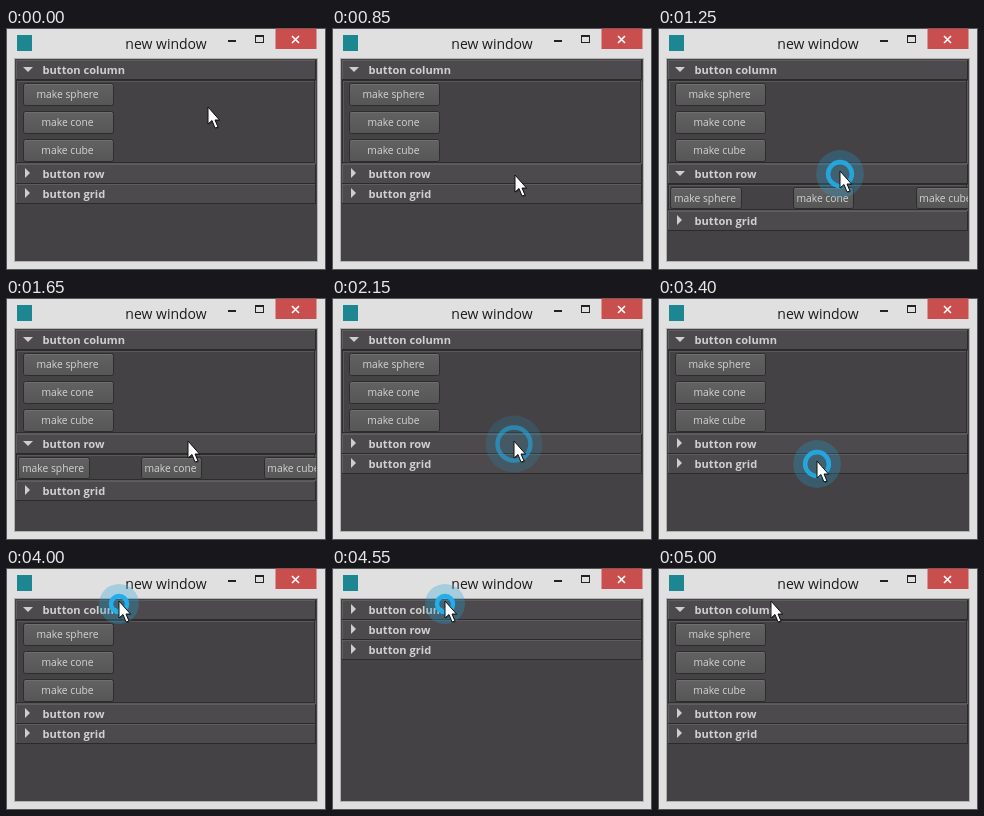
An HTML page with a canvas for the animation above (5.05 s loop, 320 by 242 pixels).

```html
<!DOCTYPE html>
<html lang="en">
<head>
<meta charset="utf-8">
<title>new window</title>
<style>
html, body { margin: 0; width: 320px; height: 242px; overflow: hidden; }
canvas { display: block; }
</style>
</head>
<body>
<canvas id="stage" width="320" height="242"></canvas>
<script>
const ctx = document.getElementById('stage').getContext('2d');
const LOOP = 5050, STEP = 50, RING = 450;

// Each click toggles one section one step after the ring appears.
const clicks = [
  { t: 1200, section: 'row' },
  { t: 1950, section: 'row' },
  { t: 2550, section: 'grid' },
  { t: 3350, section: 'grid' },
  { t: 4000, section: 'column' },
  { t: 4550, section: 'column' }
];

// Cursor moves: start, end, destination x, y.
const moves = [
  [50, 150, 202, 77],
  [450, 850, 183, 147],
  [950, 1050, 182, 143],
  [2500, 2550, 159, 163],
  [3800, 3850, 113, 33]
];

function rect(x, y, w, h, color) {
  ctx.fillStyle = color;
  ctx.fillRect(x, y, w, h);
}

function outline(x, y, w, h, color) {
  ctx.strokeStyle = color;
  ctx.lineWidth = 1;
  ctx.strokeRect(x + .5, y + .5, w - 1, h - 1);
}

function poly(points, color) {
  ctx.beginPath();
  points.forEach(([x, y]) => ctx.lineTo(x, y));
  ctx.closePath();
  ctx.fillStyle = color;
  ctx.fill();
}

function label(text, x, y, size, color, weight = 400, align = 'left') {
  ctx.font = `${weight} ${size}px "Open Sans", sans-serif`;
  ctx.textAlign = align;
  ctx.fillStyle = color;
  ctx.fillText(text, x, y);
}

function button(text, x, y, w, h) {
  const shade = ctx.createLinearGradient(0, y, 0, y + h);
  shade.addColorStop(0, '#636263');
  shade.addColorStop(1, '#575657');
  ctx.beginPath();
  ctx.roundRect(x + .5, y + .5, w - 1, h - 1, 2);
  ctx.fillStyle = shade;
  ctx.fill();
  ctx.strokeStyle = '#2e2d2e';
  ctx.lineWidth = 1;
  ctx.stroke();
  rect(x + 2, y + 1, w - 4, 1, '#706f70');
  label(text, x + w / 2 - 1, y + h / 2 + 3.5, 10.3, '#d4d4d4', 400, 'center');
}

function header(text, y, open) {
  rect(10, y, 300, 20, '#4c4a4c');
  rect(10, y, 300, 1, '#5e5c5e');
  rect(10, y, 1, 20, '#5e5c5e');
  rect(10, y + 19, 300, 1, '#2c2b2c');
  rect(309, y, 1, 20, '#2c2b2c');
  poly(open ? [[17, y + 7], [27, y + 7], [22, y + 12]]
            : [[19, y + 4], [19, y + 14], [24, y + 9]], '#cecece');
  label(text, 36.5, y + 14, 11.1, '#d0d0d0', 700);
}

const sections = [
  { name: 'column', height: 84, draw(y) {
    ['make sphere', 'make cone', 'make cube'].forEach((s, i) => button(s, 17, y + 3 + 28 * i, 91, 23));
  } },
  { name: 'row', height: 27, draw(y) {
    button('make sphere', 12, y + 3, 72, 22);
    button('make cone', 135, y + 3, 61, 22);
    button('make cube', 258, y + 3, 61, 22);
  } },
  { name: 'grid', height: 43, draw(y) {
    ['make sphere', 'make cone', 'make cube', 'make circle'].forEach((s, i) =>
      button(s, 12 + 80 * (i % 2), y + 1 + 20 * (i >> 1), 80, 20));
  } }
];

function drawFrame() {
  rect(0, 0, 320, 242, '#e0e0e0');
  outline(0, 0, 320, 242, '#55575a');
  rect(11, 7, 15, 16, '#1d8791');
  label('new window', 160, 21, 14, '#1c1c1c', 400, 'center');
  rect(222, 12, 8, 2, '#222');
  outline(249, 7, 9, 8, '#222');
  rect(249, 7, 9, 2, '#222');
  rect(269.5, .5, 41, 20.5, '#c94f4f');
  ctx.strokeStyle = '#fff';
  ctx.lineWidth = 1.6;
  ctx.beginPath();
  ctx.moveTo(286, 8); ctx.lineTo(293, 15);
  ctx.moveTo(293, 8); ctx.lineTo(286, 15);
  ctx.stroke();
  rect(8, 30, 304, 204, '#b2b2b2');
  rect(9, 31, 302, 202, '#444244');
}

function drawSections(t) {
  let y = 32;
  ctx.save();
  ctx.beginPath();
  ctx.rect(9, 31, 301, 202);
  ctx.clip();
  for (const { name, height, draw } of sections) {
    const toggles = clicks.filter(c => c.section === name && t >= c.t + STEP).length;
    const open = (name === 'column') === (toggles % 2 === 0);
    header('button ' + name, y, open);
    y += 20;
    if (open) {
      outline(11, y + 1, 299, height - 1, '#5a585a');
      outline(10, y, 299, height - 1, '#2e2d2e');
      draw(y);
      y += height;
    }
  }
  ctx.restore();
}

function cursorAt(t) {
  let x = 202, y = 79;
  for (const [from, to, endX, endY] of moves) {
    const p = Math.min(1, Math.max(0, (t - from) / (to - from)));
    const e = p * p * (3 - 2 * p);
    x += (endX - x) * e;
    y += (endY - y) * e;
  }
  return [Math.round(x), Math.round(y)];
}

function drawRing(t, x, y) {
  const click = clicks.find(c => t >= c.t && t < c.t + RING);
  if (!click) return;
  const u = (t - click.t) / RING;
  const r = 8 + 9 * (1 - (1 - u) ** 4.8);
  const circle = radius => {
    ctx.beginPath();
    ctx.arc(x, y + 3, radius, 0, 2 * Math.PI);
  };
  ctx.globalAlpha = 1 - u;
  circle(r + 12);
  ctx.fillStyle = 'rgba(30,160,215,.3)';
  ctx.fill();
  circle(r);
  ctx.strokeStyle = '#22aeea';
  ctx.lineWidth = 4.5;
  ctx.stroke();
  ctx.globalAlpha = 1;
}

function drawCursor(x, y) {
  const arrow = [[0, 0], [0, 17], [4, 13.5], [7, 21], [10, 20], [7, 13], [11.5, 13]];
  const at = d => arrow.map(([a, b]) => [x + a + d, y + b + d]);
  poly(at(1), 'rgba(0,0,0,.3)');
  poly(at(0), '#fff');
  ctx.strokeStyle = '#111';
  ctx.lineWidth = 1;
  ctx.stroke();
}

function render(now) {
  const t = Math.floor(now % LOOP / STEP) * STEP;
  const [x, y] = cursorAt(t);
  drawFrame();
  drawSections(t);
  drawRing(t, x, y);
  drawCursor(x, y);
}

let start;
function tick(now) {
  start ??= now;
  render(now - start);
  requestAnimationFrame(tick);
}
render(0);
requestAnimationFrame(tick);
</script>
</body>
</html>
```
